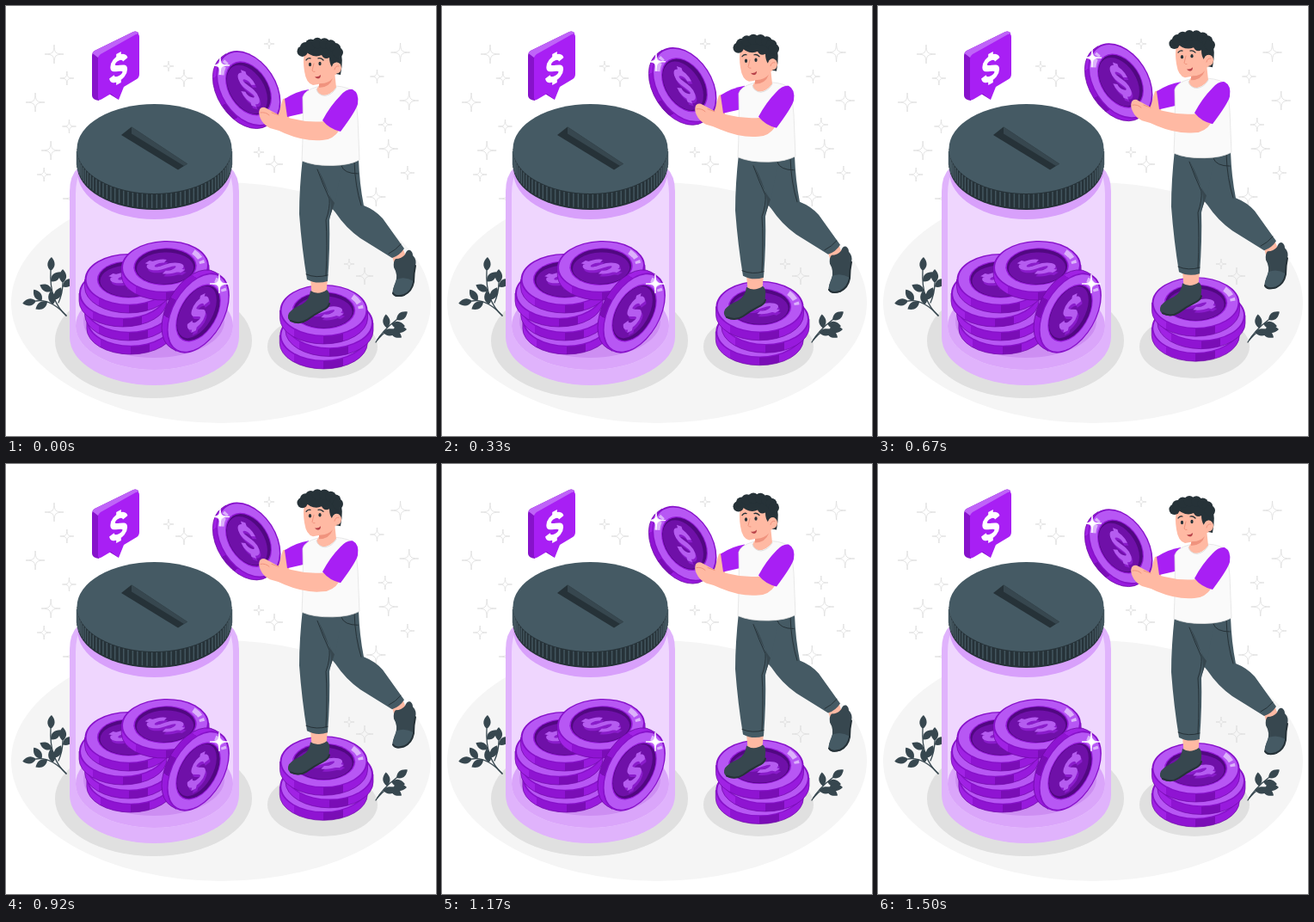
An HTML page for the animation above (1.54 s loop, 500x500 px).

```html
<!DOCTYPE html>
<html>
<head>
<meta charset="utf-8">
<style>
html, body { margin: 0; width: 100%; height: 100%; overflow: hidden; background: #fff }
svg { display: block; width: 100%; height: 100% }
.line { fill: none; stroke-linecap: round; stroke-linejoin: round }
</style>
</head>
<body>
<svg viewBox="0 0 500 500">
<defs>
  <linearGradient id="edge">
    <stop offset=".16" stop-color="#a022e4"/><stop offset=".16" stop-color="#8f14d2"/>
    <stop offset=".5" stop-color="#8f14d2"/><stop offset=".5" stop-color="#7a0db6"/>
    <stop offset=".72" stop-color="#7a0db6"/><stop offset=".72" stop-color="#981add"/>
  </linearGradient>
  <path id="dollar" fill="none" stroke-width="6.500"
    d="M9-6C7-14-8-14-8-6.500C-8 1 8.500-1 8.500 6.500C8.500 14-8 14-9.500 5.500M0-18V-11M0 11V18"/>
  <path id="leaf" d="M0 0C-6-5-5-11 0-16C5-11 6-5 0 0Z"/>
  <path id="star" d="M0-1C.05-.1.1-.05 1 0C.1.05.05.1 0 1C-.05.1-.1.05-1 0C-.1-.05-.05-.1 0-1Z"/>
</defs>

<ellipse cx="250" cy="345" rx="244" ry="140" fill="#f5f5f5"/>
<g id="sparkles" fill="none" stroke="#e0e0e0"></g>
<g fill="#e0e0e0">
  <ellipse cx="171.500" cy="389" rx="114.500" ry="67"/>
  <ellipse cx="368" cy="396" rx="64" ry="37"/>
</g>
<g id="plants" fill="#37474f" stroke="#37474f"></g>

<!-- jar -->
<path d="M84 188Q74 197 74 216V385A98.500 56 0 0 0 271 385V216Q271 197 261 188Z" fill="#e0b3fc"/>
<path d="M88 188Q81 202 81 218V372A91.500 51 0 0 0 264 372V218Q264 202 257 188Z" fill="#efd6fe"/>
<ellipse cx="172.500" cy="372" rx="91.500" ry="51" fill="#daa5fa"/>
<ellipse cx="172" cy="367" rx="82" ry="42" fill="#cd8ef2"/>
<path d="M83 185V193A89.500 55 0 0 0 262 193V185Z" fill="#d8a0fb"/>
<g id="savings"></g>

<!-- lid -->
<path d="M82.500 166V185A90 52 0 0 0 262.500 185V166Z" fill="#263238"/>
<path id="ribs" stroke="#43565f" stroke-width="1.500"/>
<ellipse cx="172.500" cy="166" rx="90" ry="52" fill="#455a64"/>
<path d="M134 150L146 140.500L211 183.500L200 190.500Z" fill="#263238"/>
<path d="M146 140.500L211 183.500L207 186L146 148.500Z" fill="#37474f"/>

<!-- bubble -->
<path d="M100 58Q100 54 103 52L148 30Q151 28.500 154 31V38L108 110Q100 109 100 104Z" fill="#8712cb"/>
<path d="M118 101L131 109L125 98Z" fill="#8712cb"/>
<path d="M100.500 55Q101 53 103 52L148 30Q152 28.500 154.500 32L107 60Z" fill="#bf64f8"/>
<path d="M107 62Q107 58 110 56L151 33Q155 31 155 36V79Q155 83 152 85L137 94L131 109L122 102L111 108.500Q107 111 107 106Z" fill="#a81ff4"/>
<use href="#dollar" transform="matrix(.86 -.46 0 1 131 72.500)" stroke="#fff"/>

<g id="floating">
  <g id="stack"></g>

  <!-- back leg -->
  <path d="M449 291L461 281L465 291L458 300L451 298Z" fill="#ffb9a3"/>
  <path d="M453 294Q460 294 464 289Q466 283 470 284Q473 286 473 290Q478 295 476 302Q474 311 474 321Q472 332 463 337Q452 340 449.500 335Q449 330 453 322Q456 312 451 304Q450 297 453 294Z" fill="#37474f"/>
  <path d="M454 318Q464 314 474 320Q472 332 463 336Q453 339 450 334Q449 330 454 318Z" fill="#455a64"/>
  <path class="line" d="M476 302Q474 311 474 321Q472 332 463 336Q453 339 450 334" stroke="#263238" stroke-width="2"/>
  <path d="M360 186Q366 222 383 240Q395 258 412 270L449 293Q458 290 463 282L438 247Q429 237 416 232Q411 207 410 178Z" fill="#455a64"/>
  <path class="line" d="M445 288Q453 284 459 277M405 181Q406 210 413 232" stroke="#263238"/>

  <!-- front leg and shoe -->
  <path d="M354 317H374L372 338L356 340Z" fill="#ffb9a3"/>
  <path d="M354 331Q363 337 373 330Q377 333 376 341Q376 350 369 354Q358 359 351 365Q341 372 331 367Q326 363 329 357Q334 351 344 347Q353 342 354 331Z" fill="#37474f"/>
  <path class="line" d="M376 346Q375 351 368 354Q358 359 350 365Q341 371 331 366" stroke="#263238" stroke-width="2"/>
  <path d="M345 176Q341 212 341 242Q344 282 350 318Q361 324 374 320Q377 280 376 249Q379 235 383 229Q386 205 393 184Z" fill="#455a64"/>
  <path class="line" d="M349 312Q361 317 374 313M372 314Q374 275 372 249Q377 235 376 224Q369 209 362 190M390 186Q393 195 409 195" stroke="#263238"/>
  <path d="M363 190Q373 208 377 225Q379 233 376 247L382 229Q374 220 363 190Z" fill="#37474f"/>

  <!-- far arm, torso -->
  <path d="M331 106L322 108L318 121L305 123L308 135L329 131Z" fill="#ffb9a3"/>
  <path d="M352 97Q338 99 324 108L327 129L349 124Z" fill="#a81ff4"/>
  <path d="M362 94Q347 98 345 106Q346 140 344 180Q358 186 380 185.500Q400 185 411 179L409 130L406 101Q399 94 383 93Z" fill="#fafafa" stroke="#e3e3e3" stroke-width=".8"/>
  <path d="M364 82L382 76L384 95Q377 104 368 104Q362 102 361 97L364 92Z" fill="#ffb9a3"/>
  <path d="M364 90Q374 91 380 84Q376 95 364 95Z" fill="#f0937e"/>
  <path class="line" d="M361 97Q363 104 371 104.500Q380 103 384 95" stroke="#e0e0e0"/>

  <!-- head -->
  <path d="M347 54Q345 64 347 76Q349 90 357 92Q370 91 378 81Q390 80 390 69L384 48Q366 42 347 54Z" fill="#ffb9a3"/>
  <g id="hair" fill="#263238">
    <path d="M345 50Q365 36 388 50Q393 60 389 80L384 79Q391 69 386 66Q381 65 379 71Q376 67 376 60Q370 63 367 57Q357 62 345 50Z"/>
  </g>
  <ellipse cx="384.500" cy="72" rx="5.500" ry="6.500" fill="#ffb9a3"/>
  <path class="line" d="M382 74Q383 69 387 70" stroke="#f0937e"/>
  <g fill="#263238"><ellipse cx="353.500" cy="68" rx="1.600" ry="2.200"/><ellipse cx="365" cy="67" rx="1.600" ry="2.200"/></g>
  <path class="line" d="M349 63Q351 60 354 61M363 61Q366 60 369 63" stroke="#263238" stroke-width="1.300"/>
  <path class="line" d="M358 67L356 75Q357 77 359 76.500" stroke="#f0937e"/>
  <path d="M359 82Q363 83 366 80Q366 84 363 84.500Q360 84 359 82Z" fill="#b8434a"/>

  <g id="heldCoin"></g>

  <!-- near arm -->
  <path d="M371 134Q352 136 333 131Q323 129 316 126L303 119Q298 116 295 120Q293 125 296 131Q299 138 307 142Q316 144 324 148Q348 158 368 156Q380 156 388 144Z" fill="#ffb9a3"/>
  <path class="line" d="M296 124Q302 123 306 127M309 124L317 127" stroke="#f0937e"/>
  <path d="M403 97Q411 101 409 114Q407 122 389 146Q376 143 368 133Q377 116 389 104Q396 96 403 97Z" fill="#a81ff4"/>
</g>
</svg>

<script>
const { sin, cos, atan2, PI } = Math;
const byId = id => document.getElementById(id);
const repeat = (count, make) => Array.from({ length: count }, (_, i) => make(i)).join('');

const ellipse = (rx, ry, attrs) => `<ellipse rx="${rx}" ry="${ry}" ${attrs}/>`;

// thick: rim depth along the tilted short axis; shine: place of the highlight, 0-100 around the rim
function coin({ x, y, rx = 51, ry = 30, tilt = 0, thick = 9, shine, sign }) {
  const ring = (scale, attrs) => ellipse(rx * scale, ry * scale, attrs);
  const highlight = shine && ring(.85, `fill="none" stroke="#dcb2fb" stroke-width="${ry * .2}" pathLength="100"
    stroke-dasharray="5 1.500 1.500 92" stroke-dashoffset="${-shine}"`);
  const face = ring(1, 'fill="#8711ca"') + ring(.96, 'fill="#b757f4"') + (highlight || '')
    + ring(.72, 'fill="#9419d8"') + ring(.69, 'fill="#510881"')
    + ellipse(rx * .65, ry * .61, `cy="${ry * .06}" fill="#6f10a8"`);
  const mark = (color, drop) =>
    `<use href="#dollar" stroke="${color}" transform="matrix(${sign} ${x + drop / 2} ${y + drop})"/>`;
  return `<g transform="translate(${x} ${y}) rotate(${tilt})">
    <path d="M${-rx} 0v${thick}a${rx} ${ry} 0 0 0 ${2 * rx} 0v${-thick}z" fill="url(#edge)" stroke="#6d0aa5" stroke-width=".7"/>${face}</g>`
    + (sign ? mark('#8a1ccb', 3) + mark('#b55cf0', 0) : '');
}

const flatSign = '.8 -.5 1.150 .3';

// coins piled upwards with a slight sideways wobble
const pile = (count, x, y, step, phase, shine) => repeat(count, i => coin({
  x: x + 5 * sin(1.9 * i + phase), y: y - step * i,
  ...(i === count - 1 && { sign: flatSign, shine })
}));

const star = (x, y, r, attrs) =>
  `<use href="#star" transform="translate(${x} ${y}) scale(${r})" ${attrs}/>`;
const glint = (x, y) => star(x, y, 11, 'fill="#fff" stroke="#fff" stroke-width=".08"');

byId('savings').innerHTML = pile(4, 141, 366, 16, .9)
  + coin({ x: 185, y: 303, tilt: -2, shine: 91, sign: flatSign })
  + coin({ x: 223.5, y: 357, tilt: 120, thick: 7, shine: 49, sign: '.85 -.45 -.3 1.200' })
  + glint(248, 323);
byId('stack').innerHTML = pile(3, 371, 383, 14.5, -.35, 91);
byId('heldCoin').innerHTML =
  coin({ x: 282, y: 96, rx: 48, ry: 32, tilt: 57, thick: 5, shine: 40, sign: '.85 .3 .35 1.150' })
  + glint(249, 69);

// sparkles: two swaying columns and a few pairs
const sparkle = (x, y, r) => star(x, y, r, `stroke-width="${.9 / r}"`);
const column = (x, y, sway, phase) => repeat(7, i =>
  sparkle(x + sway * sin(2.4 * i + phase), y + 28 * i, i % 2 ? 8 : 11));
const pair = (x, y) => sparkle(x, y, 10) + sparkle(x - 18, y - 14, 6);
byId('sparkles').innerHTML = column(56, 56, 22, 0) + column(450, 54, 20, 2.7)
  + pair(207, 84) + pair(312, 184) + pair(417, 314) + sparkle(306, 44, 6);

// a curved stem with leaves on alternating sides and one at the tip
function branch([x0, y0], [cx, cy], [x1, y1], leaves) {
  const along = (a, b, c, t) => (1 - t) ** 2 * a + 2 * t * (1 - t) * b + t * t * c;
  const slope = (a, b, c, t) => (1 - t) * (b - a) + t * (c - b);
  return `<path class="line" stroke-width="1.300" d="M${x0} ${y0}Q${cx} ${cy} ${x1} ${y1}"/>`
    + repeat(leaves, i => {
      const t = 1 - i * .19;
      const heading = atan2(slope(y0, cy, y1, t), slope(x0, cx, x1, t)) * 180 / PI + 90;
      const side = i && (i % 2 ? 50 : -50);
      return `<use href="#leaf" stroke="none"
        transform="translate(${along(x0, cx, x1, t)} ${along(y0, cy, y1, t)}) rotate(${heading + side})"/>`;
    });
}
byId('plants').innerHTML = branch([70, 360], [50, 342], [52, 308], 4)
  + branch([61, 345], [66, 334], [66, 322], 2)
  + branch([70, 360], [52, 340], [35, 343], 4)
  + branch([430, 391], [438, 377], [454, 365], 4)
  + branch([432, 388], [442, 376], [450, 376], 2);

byId('ribs').setAttribute('d', repeat(50, i => {
  const angle = (i + .5) / 50 * PI;
  return `M${172.5 + 90 * cos(angle)} ${167 + 52 * sin(angle)}v16`;
}));

byId('hair').innerHTML += repeat(8, i => {
  const angle = PI * (1.08 + i / 8);
  return `<circle cx="${365 + 21 * cos(angle)}" cy="${56 + 13 * sin(angle)}" r="6.200"/>`;
});

const LOOP = 1540, LIFT = 4.5, LEAD = 40;
const floating = byId('floating');
function draw() {
  const phase = (performance.now() + LEAD) / LOOP * 2 * PI;
  floating.setAttribute('transform', `translate(0 ${LIFT * (cos(phase) - 1)})`);
  requestAnimationFrame(draw);
}
draw();
</script>
</body>
</html>
```
